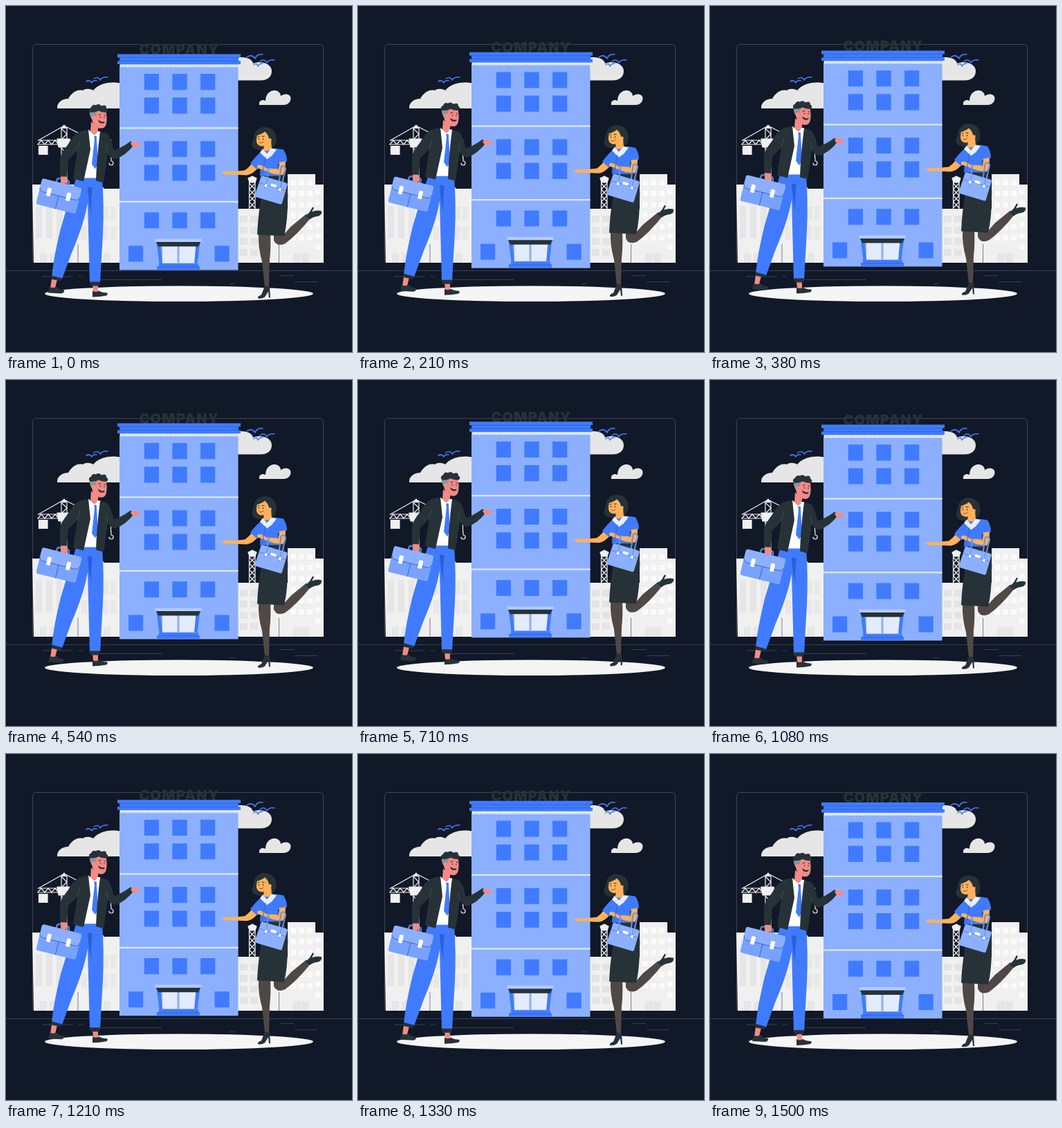
These frames come from a looping animation (500 by 500 pixels, 1540 ms). An HTML page:

```html
<!DOCTYPE html>
<html lang="en">
<head>
<meta charset="utf-8">
<style>
html, body { margin: 0; width: 100%; height: 100%; overflow: hidden; background: #111827; }
svg { display: block; width: 100vw; height: 100vh; }
text { font: 900 20px Inter, sans-serif; letter-spacing: 1.2px; }
.dark { fill: #263238; }
.blue { fill: #407bff; }
.pale { fill: #8cb0ff; }
.case { fill: #79a2ff; }
.pink { fill: #f28b86; }
.tan { fill: #ffb15a; }
.white { fill: #fff; }
.line { fill: none; stroke-linecap: round; stroke-linejoin: round; }
</style>
</head>
<body>
<svg viewBox="0 0 500 500">
  <path d="M38.500 370V60.500a5 5 0 0 1 5-5H453.500a5 5 0 0 1 5 5V370" fill="none" stroke="#555a65" stroke-width=".7"/>

  <g id="city" fill="#f0f0f0">
    <path d="M38 258H104V262H141V264H166V371H40Z"/>
    <path d="M335 293H407V243H447V258H459V371H335Z"/>
    <path d="M104 344V371M394.500 344V371" stroke="#4b505c" stroke-width=".7"/>
  </g>

  <g id="cranes" class="line" stroke="#f0f0f0" stroke-width="1.200">
    <path d="M84 173L47 194M84 173L125 194M46 194H152M46 200H152M80 177V258M88 177V258M151.500 200V219"/>
    <path d="M80 177l8 8l-8 8M80 205l8 9l-8 9l8 9l-8 9l8 9l-8 8M46 200l5-6l5 6l5-6l5 6l5-6l5 6M95 200l5-6l5 6"/>
    <path d="M152 219v5a3 3 0 1 1-3 3"/>
    <path d="M80 177L84 172L88 177M47.500 202.500H60V214.500H47.500ZM74 192H92V201L88 204H76Z" fill="#f0f0f0"/>
    <path d="M351.500 254V293M360 254V293M351.500 256l8.500 9l-8.500 9l8.500 9l-8.500 9M360 256l-8.500 9l8.500 9l-8.500 9l8.500 9"/>
    <path d="M350 249L356 246L362 249L360 255H352Z" fill="#f0f0f0"/>
  </g>

  <g fill="#e6e6e6">
    <path d="M74 148C73 140 81 134 90 134C95 125 103 120 111 122C115 119 121 119 126 122C134 112 150 108 168 112V148Z"/>
    <path d="M330 75C346 72 355 76 357 83C370 78 384 84 384 94C384 103 377 107.500 368 107.500H330Z"/>
    <path d="M366 143C365 136 371 135 375 137C375 126 383 121 389 122C395 123 397 127 397 130C404 125 412 128 411.500 134C411 140 406 143 401 143Z"/>
  </g>

  <g class="line" stroke="#407bff" stroke-width="1.500">
    <path d="M116 109Q121 106 124 111Q125 107 131 108M127 105Q133 101 136 107Q139 102 147 103"/>
    <path d="M348 74Q355 69 360 76Q362 69 371 70M367 80Q373 75 377 82Q380 77 388 78M358 85Q362 81 364 87Q366 83 371 83"/>
  </g>

  <path d="M0 382.500H500M52 391H96M105 391H111M133 395.500H225M323 401.500H331M397 389.500H416M417 398.500H450" stroke="#454b58" stroke-width=".8"/>
  <ellipse cx="250" cy="415.800" rx="194" ry="11.300" fill="#f5f5f5"/>

  <g id="float">
    <text class="dark" x="250.500" y="70.500" text-anchor="middle">COMPANY</text>

    <g id="tower">
      <path class="pale" d="M164 85H335.500V382H164Z"/>
      <path class="blue" d="M161 70H339V75H336V80H339V84.500H336V87H164V84.500H161V80H164V75H161Z"/>
      <path d="M164 75.200H336M164 80H336" stroke="#2c5bc4" stroke-width=".7"/>
      <path class="line" d="M167 87.300H335" stroke="#e4ecff" stroke-width="4" stroke-dasharray="0 4.200"/>
      <path d="M165 86H335" stroke="#e4ecff" stroke-width="2"/>
      <path d="M164 177H335.500M164 283.500H335.500" stroke="#dde7ff" stroke-width="2.200"/>
      <path fill="#e3ebff" d="M226 346H274V372H226Z"/>
      <path d="M249 346V372" stroke="#8cb0ff" stroke-width="3"/>
      <path class="blue" d="M218 345H223.500L226 373H221.500ZM280 345H274.500L272 373H276.500ZM221 372.500H278V377H280V382H218V377H221Z"/>
      <path d="M218 377.300H280" stroke="#2c5bc4" stroke-width=".7"/>
      <path class="dark" d="M216.500 341H281.500L278 348H220Z"/>
      <path fill="#b3caff" d="M215.500 337H282.500V341.500H215.500Z"/>
    </g>

    <g id="man">
      <path class="pink" d="M66 395L74 396L71 408H64ZM125 401H133V414H126Z"/>
      <path class="dark" d="M63 406Q68 409 73 406Q75 410 84 411Q85 415 80 416L61 415ZM125 412Q130 415 134 412Q139 415 146 415Q148 417 145 419Q135 421 125 421Z"/>
      <path class="blue" d="M102 247L139 249Q142 290 140 330L136 401H121L118 285Q113 315 95 357L81 395L66 392Q69 362 79 322Q90 284 102 247Z"/>
      <path d="M118 262Q119 285 124 302Q122 285 125 263Z" fill="#2b5fd6"/>
      <path class="dark" d="M66 390L81 394L79 398L65 395ZM121 399H136L135 405H122Z"/>
      <path class="white" d="M117 181L137 182L136 249L113 249Z"/>
      <path class="pink" d="M123 168L134 175L132 183Q127 191 122 182Z"/>
      <path class="blue" d="M127 188H131L131 193L133 228L129 236L124 229L128 193Z"/>
      <path class="white" d="M119 179L128 188L122 193L117 182ZM132 181L137 184L135 193L130 188Z"/>
      <path class="dark" d="M119 179L106 182Q96 188 90 200Q79 214 78 221L78 247L88 248L90 223L103 210L97 250L112 254L122 208ZM136 182L146 185Q150 189 152 196L156 209Q168 205 180 196L185 201Q172 218 157 222Q150 220 147 214Q144 236 141 256L130 253Q131 220 136 182Z"/>
      <path class="line" d="M103 209L107 196M147 213L145 202" stroke="#46525a" stroke-width=".8"/>
      <path class="pink" d="M180 199Q185 195 188 198Q193 197 194 200Q194 203 190 204L183 204Z"/>
      <path class="pink" d="M127 151L144 150Q147 163 144.500 172Q142 179 135 177Q125 174 124 163Z"/>
      <path d="M121 152L132 152L130 157Q128 165 124 164Q120 158 121 152Z" fill="#8d9498"/>
      <circle class="pink" cx="126.500" cy="162" r="3"/>
      <path class="dark" d="M121 154Q118 149 123 147Q125 142 130 144Q134 141 138 145Q145 142 145 148Q149 150 146 154Q140 155 134 152Q127 155 121 154Z"/>
      <path class="dark" d="M133 165Q136 167 139 168Q142 167 143 168Q141 171 138 170Q134 170 133 165Z"/>
      <path class="line" d="M134 158L137 157M142 158L144 159M136.500 160.500V162M142 161V162.500" stroke="#263238"/>

      <g transform="translate(52.500 249.500) rotate(14)">
        <path class="line" d="M21 2V-2Q21 -6 25 -6H35Q39 -6 39 -2V2" stroke="#5a7fd6" stroke-width="2.500"/>
        <rect class="case" width="59" height="38.500" rx="3"/>
        <path class="pale" d="M3 0H56Q59 0 59 4V14Q58 19 53 19H6Q0 19 0 14V4Q0 0 3 0Z"/>
        <path class="line" d="M0 14Q1 19 6 19H53Q58 19 59 14M29 19V38" stroke="#3f63b8" stroke-width=".9"/>
        <rect class="white" x="11" y="11" width="6" height="12" rx="1.500"/>
        <rect class="white" x="40" y="11" width="6" height="12" rx="1.500"/>
      </g>
      <path class="pink" d="M79 247L87 247Q90 252 88 256L84 258L80 256Z"/>
    </g>

    <g id="woman">
      <path fill="#4f4844" d="M365 329H382Q383 350 381 367L380 407H374L370 370Q364 349 365 329ZM387 329L403 329L412 319L434 301L440 307Q420 332 403 344Q391 349 387 339Z"/>
      <path class="dark" d="M374 405L381 406L382 422H380L379 413L374 421Q370 424 364 423Q363 420 369 418ZM433 304L439 298L443 291L445 292L442 298Q449 295 456 297Q457 303 450 304.500Q443 305 439 309Z"/>
      <path class="dark" d="M367 245L400 245Q409 265 407 282Q407 312 402 333L363 331Q364 305 368 283Z"/>
      <path class="dark" d="M369 176Q382 174 388 183Q392 190 390 198Q387 208 376 208Q367 211 358 206Q353 200 358 193Q358 180 369 176Z"/>
      <path class="tan" d="M374 194H383L384 208Q379 219 372 208Z"/>
      <path class="tan" d="M363 185Q369 178 377 182Q382 188 380 197Q375 204 368 203Q361 201 362 193Z"/>
      <circle class="tan" cx="381" cy="194" r="2.600"/>
      <path class="dark" d="M361 188Q365 178 374 180Q385 182 383 192L380 192Q379 186 374 182Q369 186 361 188Z"/>
      <path class="line" d="M364 190L366 189M370 189L373 189M365.500 192V193.500M371.500 192V193.500" stroke="#263238"/>
      <path class="line" d="M366 198Q369 200 372 197" stroke="#9c4f2a"/>
      <path class="tan" d="M357 226L365 233Q357 244 348 245L323 244Q315 245 312 241Q318 238 325 240L345 238Q351 234 357 226Z"/>
      <path class="blue" d="M371 209Q380 212 388 206L401 208Q406 216 406 225L393 229L396 246H367L368 232L363 237L353 228Q362 216 371 209Z"/>
      <path d="M371 207L377 214L384 206L391 208L384 217L377 222L370 215L367 212Z" fill="#e8efff"/>
      <path class="tan" d="M395 226L404 225Q404 240 400 245L386 243L373 238L364 235Q361 231 366 230Q372 231 376 235L394 236Z"/>
      <path class="line" d="M375 219L370 245M393 230V237" stroke="#2b5fd6" stroke-width=".9"/>

      <g transform="translate(369 245.500) rotate(16.500)">
        <path class="line" d="M9 1L7 -13M27 1L24 -20Q28 -25 31 -19L32 3" stroke="#6590f0" stroke-width="2"/>
        <path class="pale" d="M2 0H37Q40 0 40 3V30Q40 32 38 32H2Q-1 32 -1 29L0 3Q0 0 2 0Z"/>
        <path class="line" d="M0 11H40M10 1V16M31 1V16" stroke="#5d86e0" stroke-width=".9"/>
        <path class="white" d="M17 7H25V11H17ZM9 10H12V14H9ZM30 10H33V14H30Z"/>
      </g>
    </g>
  </g>
</svg>
<script>
const byId = id => document.getElementById(id);

function grid(parent, xs, ys, w, h, fill) {
  const d = ys.flatMap(y => xs.map(x => `M${x} ${y}h${w}v${h}h${-w}Z`)).join('');
  const path = document.createElementNS('http://www.w3.org/2000/svg', 'path');
  path.setAttribute('d', d);
  path.setAttribute('fill', fill);
  byId(parent).append(path);
}

grid('tower', [199.7, 240.4, 281], [98.7, 132.9, 195.8, 230.1, 298.8], 21.3, 23.1, '#407bff');
grid('tower', [177, 301.5], [347], 21.2, 23, '#407bff');
grid('city', [43, 58, 73], [289], 9, 47, '#e6e6e6');
grid('city', [109, 140, 151], [290, 318], 8, 20, '#e8e8e8');
grid('city', [49, 63, 77, 141], [357], 10, 14, '#e6e6e6');
grid('city', [338, 353], [303, 319, 335, 351], 11, 10, '#e4e4e4');
grid('city', [411, 423, 435], [251, 267, 283, 299, 315, 331], 8, 8, '#fafafa');
grid('city', [447], [265, 281, 297, 313, 329, 345], 8, 7, '#fafafa');
grid('city', [415, 427], [357], 11, 14, '#e6e6e6');

const PERIOD = 1540, LEAD = 45, LIFT = 10;

function draw() {
  const phase = (performance.now() + LEAD) % PERIOD / PERIOD;
  const y = -LIFT * (1 - Math.abs(2 * phase - 1));
  byId('float').setAttribute('transform', `translate(0 ${y})`);
  requestAnimationFrame(draw);
}
draw();
</script>
</body>
</html>
```
